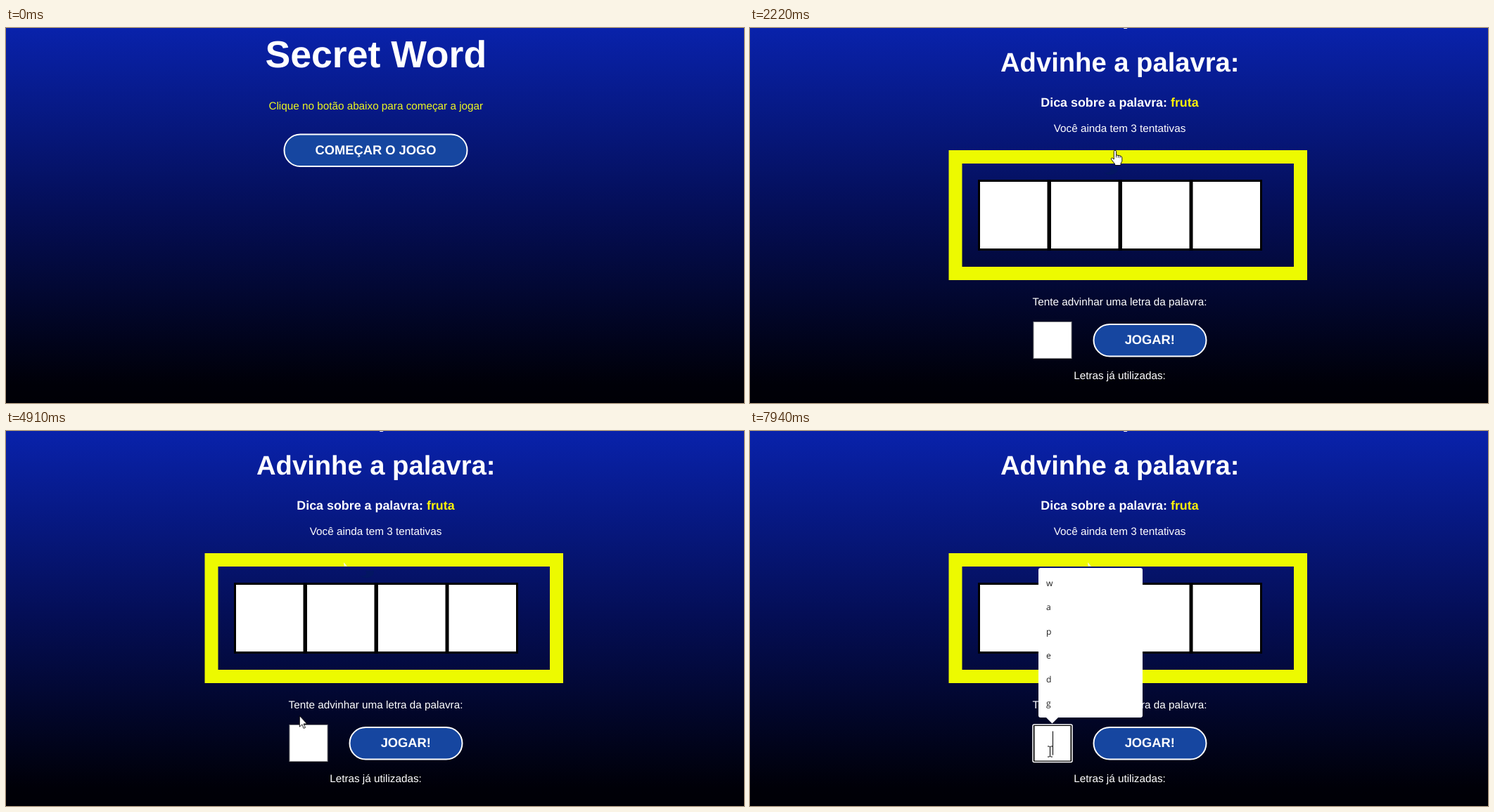
These frames come from a looping animation (1049x534 px, 8 s). An HTML page:

```html
<!DOCTYPE html>
<html lang="pt">
<head>
<meta charset="utf-8">
<title>Secret Word</title>
<style>
html, body { margin: 0; width: 100%; height: 100%; overflow: hidden; background: #000; }
body { background: linear-gradient(0deg, #000006 0%, #000008 5%, #040e56 51%, #0922ab 100%); }
svg { display: block; width: 100%; height: 100%; }
text {
  font: 15.28px "Liberation Sans", Arial, sans-serif;
  fill: #fff; text-anchor: middle; text-rendering: geometricPrecision;
}
.h1 { font-size: 53.6px; font-weight: bold; }
.h2 { font-size: 38.2px; font-weight: bold; }
.h3 { font-size: 17.88px; font-weight: bold; }
.label { font-size: 18.34px; font-weight: bold; }
.hint { fill: #ecf622; }
.fruit { fill: #fcf208; }
.btn { fill: #1646a0; stroke: #fff; stroke-width: 2; }
.menu text { font: 12.2px "Open Sans", "Noto Sans", sans-serif; fill: #222; text-anchor: start; }

/* one 8 s clock for everything */
.start, .game, .arrow, .hand, .beam, .focus, .menu, .caret, .trace {
  animation: 8s step-end infinite;
}
.start { animation-name: start; }
.game  { animation-name: game; }
.arrow { animation-name: arrow; }
.hand  { animation-name: hand; }
.beam  { animation-name: beam; }
.focus { animation-name: focus; }
.menu  { animation-name: menu; }
.caret { animation-name: caret; }
.trace { animation-name: trace; }
.hover  { animation: hover 8s infinite; }
.cursor { animation: move 8s linear infinite; }

@keyframes start { 0% { opacity: 1 } 27.75%, 100% { opacity: 0 } }
@keyframes game  { 0% { opacity: 0 } 27.75%, 100% { opacity: 1 } }
@keyframes arrow {
  0% { opacity: 0 } 2.5% { opacity: 1 } 9.125% { opacity: 0 }
  43.375% { opacity: 1 } 60.1% { opacity: 0 } 61.0625% { opacity: 1 }
  79.25%, 100% { opacity: 0 }
}
@keyframes hand { 0% { opacity: 0 } 9.125% { opacity: 1 } 43.375%, 100% { opacity: 0 } }
@keyframes beam {
  0% { opacity: 0 } 60.1% { opacity: 1 } 61.0625% { opacity: 0 } 79.25%, 100% { opacity: 1 }
}
@keyframes focus { 0% { opacity: 0 } 86%, 100% { opacity: 1 } }
@keyframes menu  { 0% { opacity: 0 } 86.875% { opacity: .7 } 87.75%, 100% { opacity: 1 } }
@keyframes caret {
  0% { opacity: 0 } 86% { opacity: 1 } 92.625% { opacity: 0 } 99.25%, 100% { opacity: 1 }
}
@keyframes trace { 0% { opacity: 0 } 45.125%, 100% { opacity: 1 } }
@keyframes hover {
  0%, 9.7% { fill: #1646a0; animation-timing-function: ease }
  13.5%, 100% { fill: #0922af }
}
@keyframes move {
  0% { transform: translate(548px, 376px) }
  2.5% { transform: translate(548px, 376px); animation-timing-function: steps(2, end) }
  4.125% { transform: translate(531px, 306px) }
  7.375% { transform: translate(531px, 306px); animation-timing-function: steps(3, start) }
  10% { transform: translate(509px, 190px); animation-timing-function: steps(2, start) }
  11.75% { transform: translate(519px, 174px) }
  43.375% { transform: translate(519px, 174px); animation-timing-function: steps(2, start) }
  45.125% { transform: translate(480px, 187px); animation-timing-function: steps(7, start) }
  51.375% { transform: translate(386px, 236px); animation-timing-function: steps(3, start) }
  53.8125% { transform: translate(386px, 288px) }
  56.25% { transform: translate(386px, 288px); animation-timing-function: steps(5, start) }
  61.0625% { transform: translate(427px, 437px); animation-timing-function: steps(5, start) }
  65.875% { transform: translate(376px, 277px) }
  74.875% { transform: translate(376px, 277px); animation-timing-function: steps(1, start) }
  75.75% { transform: translate(386px, 311px); animation-timing-function: steps(6, start) }
  81%, 100% { transform: translate(426px, 456px) }
}
</style>
</head>
<body>
<svg viewBox="0 0 1049 534">
  <g class="start">
    <text class="h1" x="525.8" y="55.5">Secret Word</text>
    <text class="hint" x="525.8" y="116">Clique no botão abaixo para começar a jogar</text>
    <rect class="btn hover" x="395.5" y="151.5" width="260" height="45.5" rx="22.75"/>
    <text class="label" x="525.5" y="180">COMEÇAR O JOGO</text>
  </g>

  <g class="game">
    <path fill="#fff" d="M531 0h5.500l-1 1h-4z"/>
    <text class="h2" x="525.8" y="62">Advinhe a palavra:</text>
    <text class="h3" x="525.5" y="112">Dica sobre a palavra: <tspan class="fruit">fruta</tspan></text>
    <text x="525.5" y="148">Você ainda tem 3 tentativas</text>

    <path d="M503 206q9 7 19-1l1-6h-12q5 8-8 7z" fill="#021a5c" opacity=".55"/>
    <rect x="292" y="183.500" width="490.500" height="166" fill="none" stroke="#edfa00" stroke-width="19"/>
    <path class="trace" d="M480 187l5 5.500h-4.500z" fill="#fbfdd0"/>
    <rect x="324" y="216" width="404" height="101"/>
    <g fill="#fff">
      <rect x="327" y="219" width="95.500" height="95"/>
      <rect x="428" y="219" width="95.500" height="95"/>
      <rect x="529" y="219" width="95.500" height="95"/>
      <rect x="629.500" y="219" width="95.500" height="95"/>
    </g>

    <text x="525.5" y="395">Tente advinhar uma letra da palavra:</text>
    <rect x="403" y="418.500" width="54" height="52" fill="#fff" stroke="#8a8a8a"/>
    <g class="focus">
      <rect x="402" y="418" width="56" height="53.500" rx="2" fill="#000" stroke="#fff" stroke-width="1.500"/>
      <rect x="404.500" y="420" width="51" height="49.500" fill="#fff"/>
    </g>
    <path class="caret" d="M430.500 427.500V461.500" stroke="#000"/>
    <rect class="btn" x="488.500" y="422" width="160" height="45.500" rx="22.750"/>
    <text class="label" x="568.300" y="450">JOGAR!</text>
    <text x="525.5" y="500">Letras já utilizadas:</text>

    <g class="menu">
      <path d="M413 195H555a3 3 0 0 1 3 3V405a3 3 0 0 1-3 3H438L429.500 416.500 421 408H413a3 3 0 0 1-3-3V198a3 3 0 0 1 3-3z" fill="#fff"/>
      <text x="421" y="221">w</text>
      <text x="421" y="255.300">a</text>
      <text x="421" y="289.500">p</text>
      <text x="421" y="323.800">e</text>
      <text x="421" y="358">d</text>
      <text x="421" y="392.300">g</text>
    </g>
  </g>

  <g class="cursor" stroke="#000" stroke-linejoin="round">
    <path class="arrow" d="M.5.5V16.200L4 12.900 6.300 18.400 8.600 17.400 6.300 12H11z" fill="#fff" stroke-width=".9"/>
    <g class="hand" stroke-width=".9">
      <path d="M-1.700 1.800a1.600 1.600 0 0 1 3.200 0V6.800l5.900 1.300q2.400.6 2.400 2.900v4.500L8 19v2.500H-.3V19.800L-5.400 13.200q-.8-1.700.7-2.200 1.300-.2 3 2z" fill="#fff"/>
      <path d="M1.500 6.500v4M4.300 7.500v3.300M7 8.200v3" fill="none" stroke-width=".8"/>
    </g>
    <path class="beam" d="M-3-7h2.500l1 1 1-1H4M.5-6V7M-3 8h2.500l1-1 1 1H4" fill="none"/>
  </g>
</svg>
</body>
</html>
```
